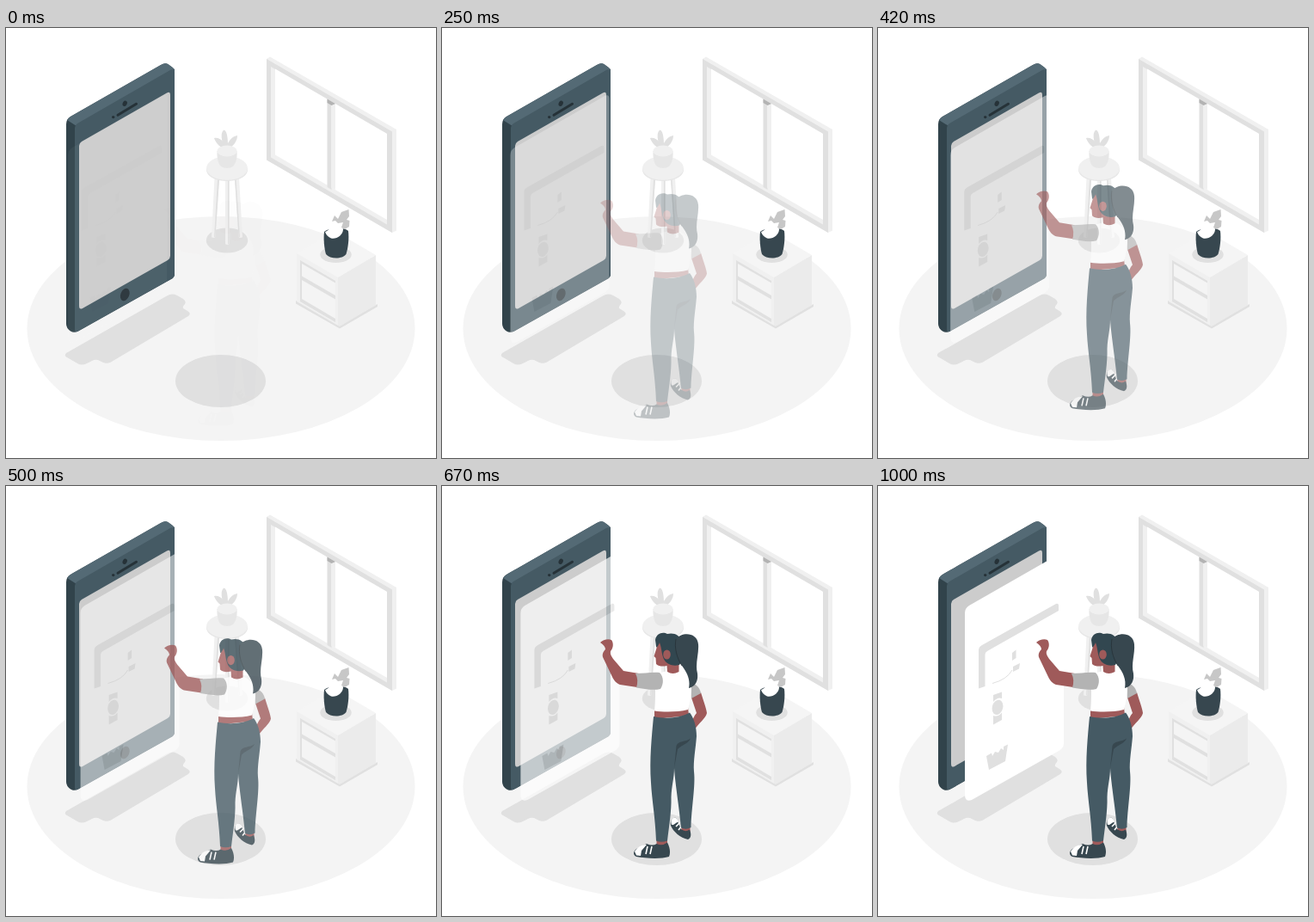
Write an HTML page that moves like this. It is 500 px wide and 500 px high and loops after 1040 ms.

```html
<!DOCTYPE html>
<html lang="en">
<head>
<meta charset="utf-8">
<title>Shopping on a phone</title>
<style>
  html, body { margin: 0; width: 100%; height: 100%; overflow: hidden; background: #fff; }
  svg { display: block; width: 100%; height: 100%; }
  .floor { fill: #f4f4f4; }
  .pale { fill: #f0f0f0; }
  .mid { fill: #e6e6e6; }
  .grey { fill: #e0e0e0; }
  .white { fill: #fff; }
  .slate { fill: #455a64; }
  .dark { fill: #37474f; }
  .ink { fill: #263238; }
  .skin { fill: #9f5a5a; }
  .sleeve { fill: #b3b3b3; }
</style>
</head>
<body>
<svg viewBox="0 0 500 500" xmlns="http://www.w3.org/2000/svg">
  <ellipse class="floor" cx="250" cy="349.5" rx="225.5" ry="130.5"/>

  <g id="shadows" class="grey">
    <ellipse cx="249.5" cy="410.5" rx="52.5" ry="30.5"/>
    <ellipse cx="257" cy="247" rx="24.2" ry="14.5"/>
    <path d="M70 378 L187 311.500 Q193 308 199 311 L206 315 Q210 318 208 321 Q205 324 206 326 L211 329 Q216 332 212 335 L122 388.500 Q117 391 112 388.500 L107 386 Q104 385 100 387 L94 390 Q88 393 83 390 L71 383 Q67 381 70 378Z"/>
  </g>

  <g id="window">
    <path class="pale" d="M303 36 L307 33.500 L454 118 V235.500 L449 238 L303 153Z"/>
    <path class="grey" d="M303 36 L449 120.500 V238 L303 153.500Z"/>
    <path class="pale" d="M308 45 L443 123 V228.500 L308 150.500Z"/>
    <path class="white" d="M313 47.500 L443 123 V223 L313 147.500Z"/>
    <path class="grey" d="M373.500 83 L378.500 86 V188 L373.500 185Z"/>
    <path class="pale" d="M378.500 86 L383 88.500 V188 L378.500 186Z"/>
    <path fill="#b3b3b3" d="M373.500 82.500 L383 88 L378.500 90 L373.500 87Z"/>
  </g>

  <g id="stool">
    <path class="pale" d="M242.500 174 H248 L243.500 243 Q241 245 239 243Z M266 174 H271 L275 243 Q273 245 270.500 243Z M255 176 H259.500 V251 Q257 253 255 251Z"/>
    <path class="grey" d="M246 176 H248 L243.500 243 H242Z M266 176 H267.500 L272 243 H270.500Z M258 177 H259.500 V251 H258Z"/>
    <path class="mid" d="M233 163 V166 C236 182 278 182 281 166 V163Z"/>
    <ellipse class="pale" cx="257" cy="163" rx="24" ry="13.800"/>
    <g class="grey">
      <path d="M255 141 C250 132 249 121 253.500 118.500 C258 120 258 132 258 141Z"/>
      <path d="M256 141 C257 133 262 126 269 125 C269 132 264 137 259 141Z"/>
      <path d="M256 142 C249 139 244 134 242 128 C249 126 255 134 257 141Z"/>
    </g>
    <path class="mid" d="M245.500 143 C245 152 247 157 249 160 C253 164 261 164 265 160 C268 155 269 150 268.500 143Z"/>
    <ellipse class="pale" cx="257" cy="143" rx="11.500" ry="6.500"/>
  </g>

  <g id="cabinet">
    <path class="grey" d="M337 317 L388 346 L432 321 V324 L388 349.500 L337 320.500Z"/>
    <path class="pale" d="M338 262 L386 290 V346 L338 318Z"/>
    <path fill="#ebebeb" d="M386 290 L430 264 V322 L388 347 L386 346Z"/>
    <path fill="#f5f5f5" d="M338 262 L382 236 L430 264 L386 290Z"/>
    <path class="grey" d="M342 270 L383 294 V342 L342 318Z"/>
    <path class="floor" d="M344 274 L383 296.500 V311 L344 288.500Z M344 293 L383 315.500 V338 L344 315Z"/>
    <ellipse class="grey" cx="383.500" cy="263.500" rx="18.200" ry="9.500"/>
    <path class="dark" d="M370 237 C369 245 370 256 372 263 C377 269 391 269 395.500 263 C398 255 399 244 398 236 C393 231 375 232 370 237Z"/>
    <path class="white" d="M371 237 C376 235 380 231 377 221 L386 218 L392 234 C392 241 384 246 378 244.500 C374 243 372 240 371 237Z"/>
    <path fill="#c7c7c7" d="M386 222 L390 214 L398.500 211 L399 219 L396 223 L399.500 224 L399 231 L394 234 L390 232 L392 226 L386 227 L383 224 L379 225 L382 218Z"/>
  </g>

  <g id="phone">
    <path class="dark" d="M70 112 Q70 106 75 103 L180 43 Q185 40 189 42.500 L196 48 V286 Q196 290 192 292 L84 352.500 Q79 355 75 352.500 Q70 349 70 344Z" style="fill:#31434b"/>
    <path fill="#546a75" d="M71 107 Q72 105 75 103 L180 43 Q185 40 189 42.500 L194 46 Q196 48 196 52 L82 114Z"/>
    <path class="slate" d="M80 117 Q80 113 83 111 L190 49.500 Q196 46 196 53 V286 Q196 290 192 292 L84 352.500 Q80 355 80 350Z"/>
    <path fill="#ccc" d="M85 137 Q85 134 88 132 L187 75.500 Q191 73 191 78 V265 Q191 268 188 270 L89 326 Q85 328 85 323Z"/>
    <ellipse class="ink" cx="138.300" cy="310" rx="5" ry="7.500" transform="rotate(22 138.300 310)"/>
    <path d="M130 101.300 L151.500 88.300" stroke="#263238" stroke-width="3" stroke-linecap="round"/>
    <ellipse class="ink" cx="138.200" cy="87.800" rx="2.500" ry="3.300" transform="rotate(25 138.200 87.800)"/>
    <circle class="ink" cx="124.700" cy="103.600" r="1.700"/>
  </g>

  <g id="panel">
    <path class="white" d="M101 148 Q101 142 106 139 L210 79.500 Q216 76 216 82 V299 Q216 304.500 211 307.500 L109 365 Q101 368 101 359Z"/>
    <g class="grey">
      <path d="M117 191 Q117 187 121 185 L207 137 Q210 136 210 139 V145 L127 192 Q124.500 193.500 124.500 196 V233 L117 235.500Z"/>
      <path d="M156 194 L160.500 190.500 V200 L156 203Z"/>
      <path d="M157 210 L165 206 L164 212.500 L157 216Z"/>
      <path d="M134 243 L144 239.500 V247 Q139 245 134 251Z"/>
      <ellipse cx="139" cy="257.300" rx="6.200" ry="8.800" transform="rotate(15 139 257.300)"/>
      <path d="M134 267 Q140 269 144 263.500 V272 L134 277.500Z"/>
      <path d="M126 314 L132 310.500 L133 314 L136 309 L140 310 L143 305 L146 307 V303 L151 300.500 L148 320 L129 330Z"/>
    </g>
    <path d="M133 229.500 Q150 225 156 214" fill="none" stroke="#e0e0e0"/>
  </g>

  <g id="woman">
    <g id="right-arm">
      <path class="skin" d="M290 246 L301 240 C304 250 307 257 308 264 C307 270 298 276 294 283 L289 277 C292 271 293 267 296 264Z"/>
      <path class="sleeve" d="M288 228 C296 230 300 235 301 241 L290 247Z"/>
    </g>
    <g id="shoes">
      <path class="skin" d="M249.500 409 H262 V419 H249.500Z M278.500 394 H288.500 V404 H278.500Z"/>
      <path class="dark" d="M249.500 416 Q256 419 262 414.500 C265 420 266 426 264 431 C255 434 236 433 226 431 C222 429 222 425 226 422 L238 416 Q245 419 249.500 416Z"/>
      <path class="white" d="M224 425 C228 419 233 417 238 417 L232 424 L231 430 L226 429.500Z"/>
      <path class="dark" d="M278 399 Q283 403 288 399.500 C290 405 290 409 286 411 C277 409 269 402 266 395 C265 389 268 385 272 386Z"/>
      <path class="white" d="M267 394 C265 388 268 385 272 386 L275 390 L269 394Z"/>
      <path d="M239 419 L237 428 M244 419 L242 428 M272 396 L277 391 M275 400 L279 395" stroke="#fff" stroke-width="1.600"/>
    </g>
    <path class="skin" d="M247 260 L286 257 L287 267 L247 271Z"/>
    <path class="slate" d="M246 268 C260 271 276 270 288 263.500 C293 270 296 280 296 291 C295 305 292 320 293 332 C295 348 290 375 289.500 397 Q284 400 278 397.500 C276 375 271 345 270 328 C270 340 267 348 266.500 362 C267 377 264 396 262 412.500 Q255 415 249 412.500 C248 385 244 365 243 345 C241 318 244 290 246 268Z"/>
    <path class="dark" d="M289 293.500 C283 298 275 296 272.500 302 L270 328 L274 306 C279 301 286 300 289 293.500Z"/>
    <path class="skin" d="M184 182 C187 179 193 177 197 179 C200 183 199 189 196 192 C195 195 197 198 199 201 L211 215 L229 218 L227 234 L207 231 C202 229 200 226 198 222 L187 199 C186 195 188 192 190 190 C190 187 188 185 184 182Z"/>
    <path class="white" d="M250 218 L262 215 C268 219 272 218 276 215 C284 219 290 225 290 235 C290 245 288 252 286 260 C274 263 258 263 247 261.500 C248 252 248 245 248 236Z"/>
    <path class="sleeve" d="M225 218 C235 218 244 216 253 217 C258 222 258 230 254 236 C246 238 235 236 226 234.500 Q229 226 225 218Z"/>
    <path class="skin" d="M252 180 L249 190 L246.500 198 L248.500 200 L249 207 C252 210 257 210 261.500 209 L262 216 Q268 220 275.500 216 V202 L260 185Z"/>
    <path class="dark" style="fill:#324750" d="M248 179 C249 171 257 169 262 172 C269 170 277 173 279 181 C281 190 280 203 276 208 C268 210 262 207 259 203 C255 197 256 190 253 182 C252 185 249 189 249 187Z"/>
    <ellipse class="skin" cx="261.500" cy="196" rx="4.300" ry="5.600"/>
    <path fill="#37474f" d="M272 178 C279 169 297 170 298 184 C299 195 294 207 297 218 C298 226 295 233 287 235 C289 225 285 217 279 209 C273 200 269 188 272 178Z"/>
    <path d="M272 178 C270 188 273 200 279 209" fill="none" stroke="#263238" stroke-width=".8"/>
  </g>
</svg>
<script>
  const LOOP = 1040, FPS = 24, STEPS = 25, SLIDE = 30;
  const panel = document.getElementById('panel');
  const woman = document.getElementById('woman');

  const bezier = (a, b, s) => 3 * (1 - s) ** 2 * s * a + 3 * (1 - s) * s * s * b + s ** 3;

  // Cubic easing with a slight overshoot; bisect for the curve parameter.
  function overshoot(x) {
    let lo = 0, hi = 1;
    for (let i = 0; i < 30; i++) {
      const s = (lo + hi) / 2;
      if (bezier(.36, .5, s) < x) lo = s; else hi = s;
    }
    return bezier(-.01, 1.38, hi);
  }

  function place(part, x, y, opacity) {
    part.setAttribute('transform', `translate(${x} ${y})`);
    part.setAttribute('opacity', Math.min(1, Math.max(0, opacity)));
  }

  function render(ms) {
    // Steps fall on 10 ms ticks, hence the small lead.
    const step = Math.min(STEPS - 1, Math.floor((ms % LOOP + 3.4) * FPS / 1000));
    const t = (step + 1) / STEPS;
    const rise = overshoot(t);
    place(panel, -SLIDE * (1 - t), 0, t);
    place(woman, 0, SLIDE * (1 - rise), rise);
  }

  const start = performance.now();
  function tick() {
    render(performance.now() - start);
    requestAnimationFrame(tick);
  }
  tick();
</script>
</body>
</html>
```
